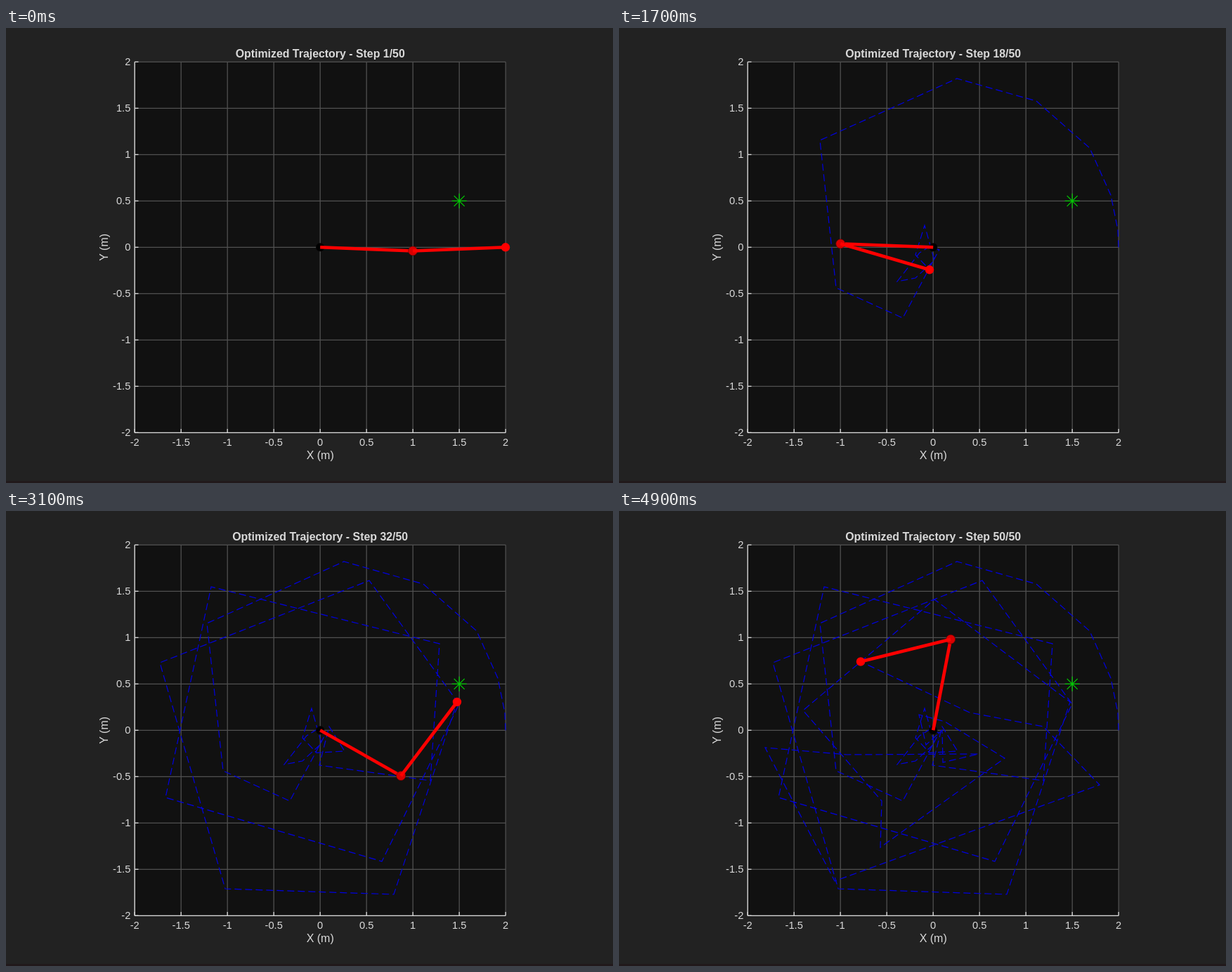
Animation of 864x648 px, one loop 5 s. Source, as an HTML page:

```html
<!DOCTYPE html>
<html lang="en">
<head>
<meta charset="utf-8">
<title>Optimized Trajectory</title>
<style>
  html, body { margin: 0; width: 100%; height: 100%; overflow: hidden; background: #222; }
  svg { display: block; width: 100vw; height: 100vh; }
  text { font-family: "Liberation Sans", Arial, sans-serif; fill: #d9d9d9; }
</style>
</head>
<body>
<svg id="stage" viewBox="0 0 864 648"></svg>
<script>
const STEPS = 50, STEP_MS = 100;
const CX = 447.2, CY = 312.3, UNIT = 132, HALF = 2 * UNIT;

// Hand position at each step, in stage pixels.
const hand = [
  [711, 312.3], [710, 287], [700, 238], [670, 171], [594, 104],
  [481, 72], [286, 160], [309, 370], [404, 413], [455.7, 315.7],
  [441, 312], [428, 320], [396, 361], [422, 356], [449, 331],
  [435, 281], [422, 323], [442, 344.3], [482, 342], [460, 307],
  [446, 362], [604, 384], [617, 189], [292, 108], [227, 408],
  [535, 499], [645, 275], [517, 99], [219, 216], [312, 538],
  [552, 546], [642, 272], [449, 126], [262, 284], [374, 413],
  [372, 479], [549, 352], [464, 300], [427, 290], [437, 333],
  [460, 312], [461, 358], [512, 346], [325, 347], [208, 337],
  [307, 527], [684, 390], [604, 307], [499, 287], [344, 214.5]
];
// Steps during which the elbow bends the other way.
const flipped = [[11, 15], [21, 29], [42, 43]];

const stage = document.getElementById("stage");

function add(tag, attrs, text) {
  const el = document.createElementNS("http://www.w3.org/2000/svg", tag);
  for (const key in attrs) el.setAttribute(key, attrs[key]);
  if (text !== undefined) el.textContent = text;
  stage.appendChild(el);
  return el;
}

function set(el, attrs) {
  for (const key in attrs) el.setAttribute(key, attrs[key]);
}

function line(x1, y1, x2, y2, stroke, width) {
  return add("line", { x1, y1, x2, y2, stroke, "stroke-width": width });
}

function label(x, y, text, size, anchor = "middle", extra = {}) {
  return add("text", { x, y, "font-size": size, "text-anchor": anchor, ...extra }, text);
}

function drawAxes() {
  const left = CX - HALF, right = CX + HALF, top = CY - HALF, bottom = CY + HALF;
  add("rect", { width: 864, height: 648, fill: "#222" });
  add("rect", { y: 645, width: 864, height: 3, fill: "#21191b" });
  add("rect", { x: left, y: top, width: 2 * HALF, height: 2 * HALF, fill: "#111" });
  for (let v = -2; v <= 2; v += 0.5) {
    const x = CX + v * UNIT, y = CY - v * UNIT;
    line(x, top, x, bottom, "#505050", 1.3);
    line(left, y, right, y, "#505050", 1.3);
  }
  const ink = "#d9d9d9";
  line(left, top, left, bottom, ink, 1.3);
  line(left, bottom, right, bottom, ink, 1.3);
  for (let v = -2; v <= 2; v += 0.5) {
    const x = CX + v * UNIT, y = CY - v * UNIT;
    line(x, bottom, x, bottom - 5.3, ink, 1.3);
    line(left, y, left + 5.3, y, ink, 1.3);
    label(x, 595.3, v, 14.67);
    label(177.3, y + 5, v, 14.67, "end");
  }
  label(CX, 614, "X (m)", 16);
  label(0, 0, "Y (m)", 16, "middle", { transform: `translate(144.5 ${CY}) rotate(-90)` });
}

function drawGoal() {
  const x = CX + 1.5 * UNIT, y = CY - 0.5 * UNIT;
  for (const [dx, dy] of [[10.5, 0], [0, 10.5], [7.5, 7.5], [7.5, -7.5]])
    line(x - dx, y - dy, x + dx, y + dy, "#00d000", 1.2);
}

// Two equal links: the elbow follows from the hand position.
function elbowAt(step) {
  const [x, y] = hand[step - 1];
  const dx = x - CX, dy = CY - y;
  const bend = Math.acos(Math.min(1, Math.hypot(dx, dy) / HALF));
  const side = flipped.some(([a, b]) => step >= a && step <= b) ? 1 : -1;
  const angle = Math.atan2(dy, dx) + side * bend;
  return [CX + UNIT * Math.cos(angle), CY - UNIT * Math.sin(angle)];
}

drawAxes();
const title = label(CX, 42.3, "", 15.9, "middle", { "font-weight": "bold" });
const trail = add("polyline", {
  fill: "none", stroke: "#0000e0", "stroke-width": 1.2, "stroke-dasharray": "10 5"
});
drawGoal();
add("circle", { cx: CX, cy: CY, r: 6, fill: "#000" });
const upper = line(CX, CY, CX, CY, "#f00", 4.6);
const elbow = add("circle", { r: 6.5, fill: "#d80000", stroke: "#700000", "stroke-width": 0.7 });
const lower = line(CX, CY, CX, CY, "#f00", 4.6);
const tip = add("circle", { r: 6.2, fill: "#f00" });

function render(ms) {
  const step = Math.floor(ms / STEP_MS) % STEPS + 1;
  const [ex, ey] = elbowAt(step);
  const [hx, hy] = hand[step - 1];
  title.textContent = `Optimized Trajectory - Step ${step}/${STEPS}`;
  set(trail, { points: hand.slice(0, step).join(" ") });
  set(upper, { x2: ex, y2: ey });
  set(elbow, { cx: ex, cy: ey });
  set(lower, { x1: ex, y1: ey, x2: hx, y2: hy });
  set(tip, { cx: hx, cy: hy });
}

const start = performance.now();
function tick() {
  render(performance.now() - start);
  requestAnimationFrame(tick);
}
tick();
</script>
</body>
</html>
```
